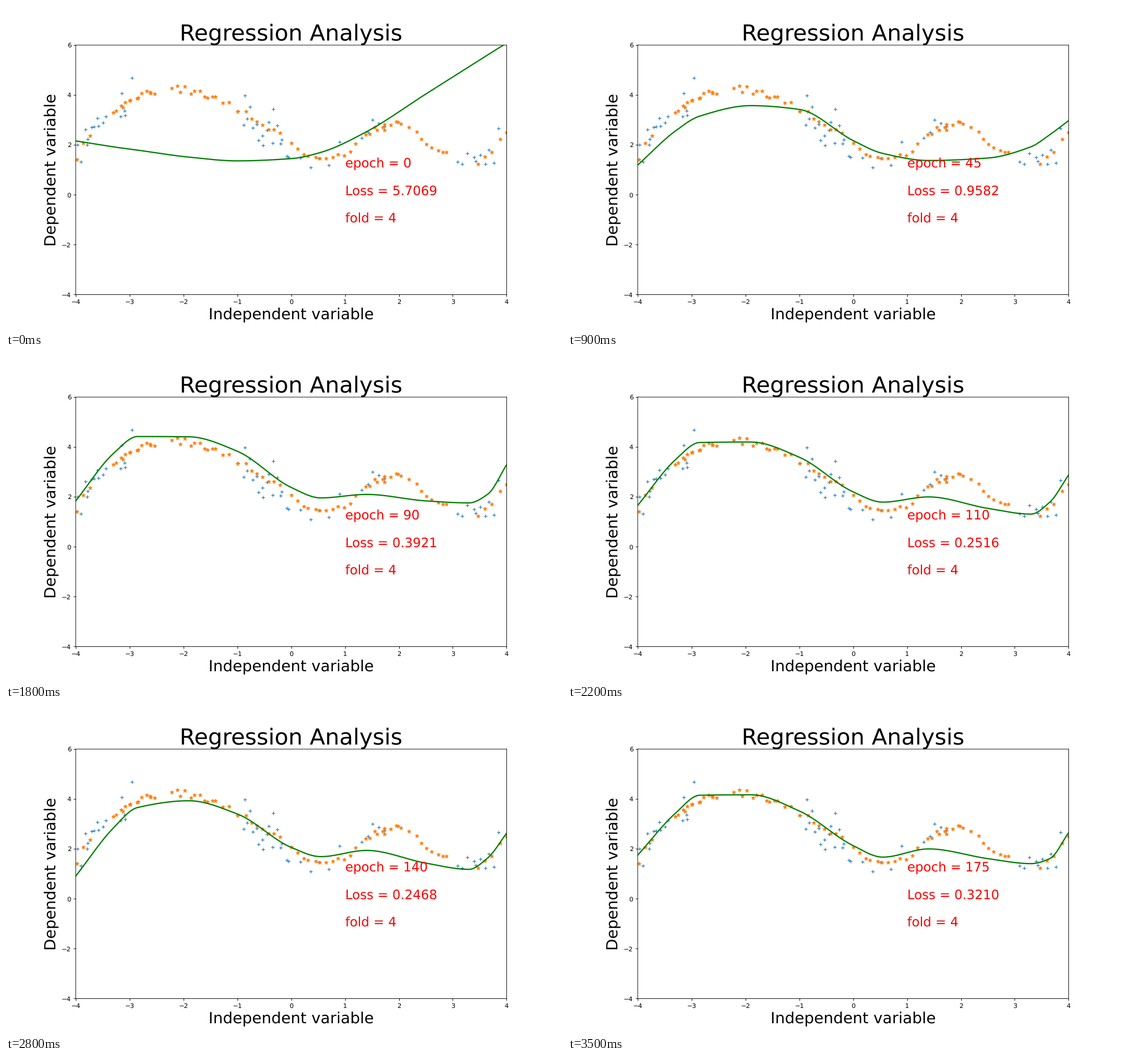
These frames come from a looping animation (980 px wide and 572 px high, 3.6 s). A matplotlib script:

```python
import numpy as np
import matplotlib.pyplot as plt
from matplotlib.animation import FuncAnimation

plt.rcParams.update({"font.family": "DejaVu Sans", "text.hinting": "none",
                     "path.snap": False})
FRAMES, INTERVAL = 36, 100
W, H, DPI = 980, 572, 81.667
rng = np.random.default_rng(4)

# Trend behind the samples, as a few turning points.
trend_x = np.array([-4, -3.3, -2.85, -2, -1.2, -0.2, 0.6, 1, 1.6, 2, 2.7, 3.4, 4])
trend_y = np.array([1.6, 3.3, 3.95, 4.25, 3.65, 2.3, 1.45, 1.7, 2.65, 2.85, 1.75, 1.2, 2.5])

# Clusters of samples: start, end, count.
train = [(-3.98, -3.75, 3), (-3.3, -2.55, 14), (-2.24, -1.18, 13), (-0.97, -0.2, 8),
         (0, 1.2, 12), (1.4, 2.05, 11), (2.2, 2.9, 8), (3.45, 4, 5)]
test = [(-3.95, -3.45, 11), (-3.2, -3, 5), (-0.95, -0.05, 19),
        (0.15, 0.9, 5), (1.3, 1.75, 5), (3.1, 3.85, 10)]

# Epoch: loss and the height of the fit at each knot.
knots = np.array([-4, -3.3, -2.85, -1.9, -1, 0, 0.55, 1.4, 2.5, 3.3, 3.65, 4])
poses = {
    0: (5.7069, [2.16, 1.92, 1.79, 1.51, 1.36, 1.45, 1.70, 2.53, 4.04, 5.13, 5.61, 6.08]),
    30: (1.1934, [0.52, 1.62, 2.27, 3.03, 3.20, 2.22, 1.71, 1.37, 1.71, 2.40, 2.94, 3.45]),
    65: (0.7150, [2.09, 3.81, 4.33, 4.30, 3.72, 2.11, 1.59, 1.38, 1.16, 1.29, 1.70, 2.34]),
    90: (0.3921, [1.84, 3.74, 4.42, 4.41, 3.83, 2.38, 1.96, 2.10, 1.84, 1.76, 2.11, 3.29]),
    110: (0.2516, [1.66, 3.49, 4.18, 4.20, 3.59, 2.20, 1.79, 2.00, 1.54, 1.31, 1.79, 2.88]),
    140: (0.2468, [0.91, 2.84, 3.66, 3.93, 3.40, 2.06, 1.69, 1.94, 1.43, 1.18, 1.64, 2.63]),
    175: (0.3210, [1.75, 3.43, 4.15, 4.17, 3.52, 2.13, 1.67, 2.00, 1.61, 1.41, 1.61, 2.65]),
}
epochs = list(poses)


def smooth(x, xk, yk):
    """Monotone cubic interpolation."""
    h = np.diff(xk)
    s = np.diff(yk) / h
    a, b = s[:-1], s[1:]
    same = a * b > 0
    m = np.r_[s[0], np.where(same, 2 * a * b / np.where(same, a + b, 1), 0), s[-1]]
    i = np.clip(np.searchsorted(xk, x, side="right") - 1, 0, len(h) - 1)
    t = (x - xk[i]) / h[i]
    return ((1 + 2 * t) * (1 - t) ** 2 * yk[i] + t * (1 - t) ** 2 * h[i] * m[i]
            + t * t * (3 - 2 * t) * yk[i + 1] + t * t * (t - 1) * h[i] * m[i + 1])


def sample(clusters, noise):
    x = np.concatenate([np.linspace(*c) for c in clusters])
    x = x + rng.normal(0, 0.02, x.size)
    return x, smooth(x, trend_x, trend_y) + rng.normal(0, noise, x.size)


def state(epoch):
    i = min(np.searchsorted(epochs, epoch, side="right") - 1, len(epochs) - 2)
    e0, e1 = epochs[i:i + 2]
    (loss0, y0), (loss1, y1) = poses[e0], poses[e1]
    u = (epoch - e0) / (e1 - e0)
    heights = np.array(y0) * (1 - u) + np.array(y1) * u
    if e0 >= 65:  # the late fit overshoots between poses
        heights = heights * (1 + 0.09 * np.sin(np.pi * u))
    return loss0 ** (1 - u) * loss1 ** u, heights


fig, ax = plt.subplots(figsize=(12, 7.0042), dpi=DPI)
fig.subplots_adjust(left=122.9 / W, right=882.4 / W,
                    bottom=1 - 509.5 / H, top=1 - 69.05 / H)
ax.set_title("Regression Analysis", fontsize=35)
ax.set_xlabel("Independent variable", fontsize=24)
ax.set_ylabel("Dependent variable", fontsize=24)
ax.set_xlim(-4, 4)
ax.set_ylim(-4, 6)
ax.plot(*sample(test, 0.4), "+", color="C0")
ax.plot(*sample(train, 0.08), "*", color="C1")

grid = np.linspace(-4, 4, 300)
curve, = ax.plot([], [], color="green", lw=2)
style = dict(fontsize=20, color="red")
epoch_text = ax.text(1, 1.1, "", **style)
loss_text = ax.text(1, 0, "", **style)
ax.text(1, -1.1, "fold = 4", **style)


def update(k):
    epoch = 5 * k
    loss, heights = state(epoch)
    curve.set_data(grid, smooth(grid, knots, heights))
    epoch_text.set_text(f"epoch = {epoch}")
    loss_text.set_text(f"Loss = {loss:.4f}")
    return curve, epoch_text, loss_text


anim = FuncAnimation(fig, update, frames=FRAMES, interval=INTERVAL, repeat=True)
plt.show()
```
